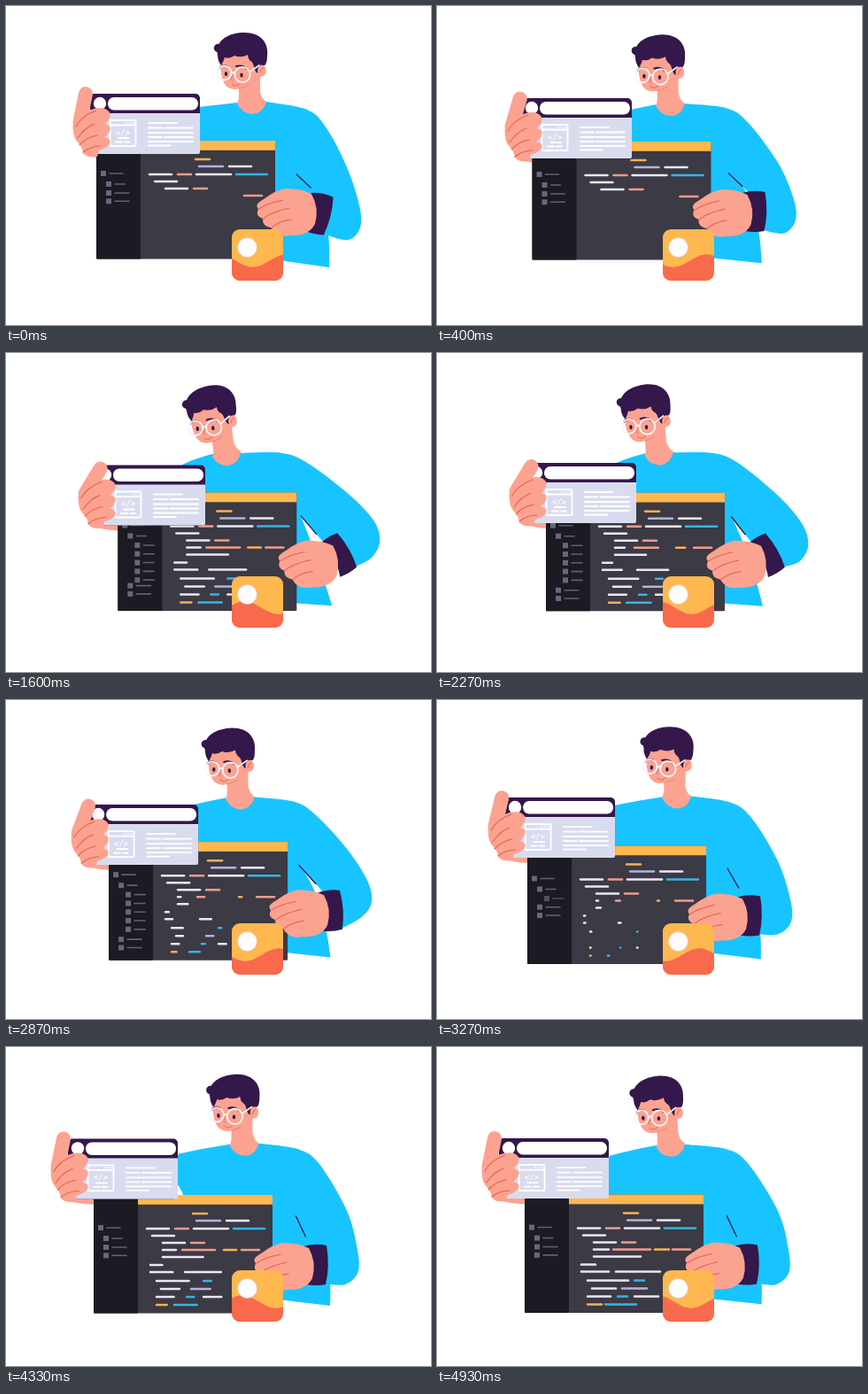
An HTML page for the animation above (5 s loop, 480x360 px).

```html
<!DOCTYPE html>
<html lang="en">
<head>
<meta charset="utf-8">
<title>Developer arranging windows</title>
<style>
  html, body { margin: 0; width: 100%; height: 100%; overflow: hidden; background: #fff; }
  svg { display: block; width: 100vw; height: 100vh; }
  text { font: bold 9px "DejaVu Sans Mono", monospace; }
</style>
</head>
<body>
<svg viewBox="0 0 480 360" fill="none" stroke-linecap="round" stroke-linejoin="round">
  <path id="body" fill="#18c4ff"/>
  <path id="sleeve" fill="#18c4ff"/>
  <path id="armpit" stroke="#2f144c" stroke-width="1.3"/>

  <g id="head">
    <path fill="#fba390" d="M263 84V101Q263 107 261 110Q267 122 279 122Q290 121 294 108Q288 104 287 96V76Z"/>
    <path fill="#fba390" d="M243 52Q241 75 245 84Q248 93 257 94Q268 94 275 88L288 80L290 52Z"/>
    <path stroke="#ee8474" stroke-width="1" d="M264 93Q270 92 274 89"/>
    <circle cx="239.500" cy="47.500" r="4.700" fill="#34174b"/>
    <path fill="#34174b" d="M239 55C236 41 248 31 267 30C288 29 297 42 295 56Q295 65 292 67Q286 66 284 76C279 72 281 64 276 62Q273 59 273 55Q266 59 258 56Q252 60 247 58Q246 62 243 67Q239 62 239 55Z"/>
    <ellipse cx="289" cy="73" rx="4.800" ry="6.500" fill="#fba390"/>
    <path stroke="#ee6a58" d="M287 75Q288 70 291 70M256 79Q253 83 256 84M255 88Q259 92 264 88"/>
    <path stroke="#34174b" stroke-width="2" d="M241 70Q244 66 250 68M260 68Q267 66 272 71"/>
    <g fill="#34174b">
      <ellipse cx="248.500" cy="76.500" rx="1.700" ry="2.500"/>
      <ellipse cx="266" cy="78" rx="1.700" ry="2.500"/>
    </g>
    <g stroke="#f6f4f8" stroke-width="1.800">
      <circle cx="246.500" cy="75.500" r="8"/>
      <circle cx="267" cy="77.500" r="8.700"/>
      <path d="M254.300 76Q256 74 258.500 76M275.500 74L286 67"/>
    </g>
  </g>

  <path id="thumb" fill="#fba390" d="M-8 56Q-8 69 4 71Q20 75 40 74V50Z"/>

  <g id="editor">
    <rect width="202" height="133.500" rx="1" fill="#3b3a45"/>
    <rect x="50" width="152" height="10.800" fill="#ffb74f"/>
    <rect width="50" height="133.500" rx="1" fill="#1c1a22"/>
    <g id="tree"></g>
    <g id="code" stroke-width="2.500"></g>
  </g>

  <g id="browser">
    <rect width="124" height="68" rx="5" fill="#34174b"/>
    <path fill="#d9dcef" d="M0 22H124V66Q124 68 122 68H2Q0 68 0 66Z"/>
    <circle cx="11" cy="11" r="7.200" fill="#fff"/>
    <rect x="20" y="4" width="102" height="14.500" rx="7" fill="#fff"/>
    <g stroke="#fff" stroke-width="1.800">
      <rect x="22.500" y="30" width="29" height="29" rx="1"/>
      <path d="M23 35.500H51M32 50H44M29 54.500H36M39 54.500H45M41 32.800H41.100M45 32.800H45.100M48.500 32.800H48.600"/>
      <path d="M66 33H98M66 38.500H81M84 38.500H116M66 44H116M66 49H81M84 49H116M66 54H116M66 58.500H91"/>
    </g>
    <text x="37" y="47" text-anchor="middle" fill="#fff">&lt;/&gt;</text>
  </g>

  <g id="fingers">
    <path id="index" stroke="#fba390" stroke-width="16" d="M-11.500 32L-5 0"/>
    <path fill="#fba390" d="M-19.500 35Q-16 27 -5 21Q8 14 17 17Q25 21 22 27Q20 31 17 34Q25 36 22 42Q20 47 16 49Q25 51 22 57Q18 62 10 64L8 71Q-3 73 -8 67Q-9 60 -13 56Q-20 50 -19.500 35Z"/>
    <path stroke="#e5604d" stroke-width="1.100" d="M-16 37Q-10 25 7 19M-14 50Q-6 38 5 34M-12 58Q-4 49 8 47M-8 66Q1 59 12 59"/>
  </g>

  <path id="cuff" fill="#34174b" d="M-4 -22Q9 -26 22 -23Q26 0 21 21Q11 23 -1 21Q8 0 -4 -22Z"/>
  <g id="hand">
    <path fill="#fba390" d="M243 60Q232 54 214 54Q204 55 189 66Q178 72 183 77Q179 85 188 88Q187 96 197 98Q204 110 218 107Q240 108 247 94Q252 76 243 60Z"/>
    <path stroke="#e5604d" stroke-width="1.100" d="M184 77Q192 71 211 67M189 88Q196 81 218 76M198 98Q205 91 220 89"/>
  </g>

  <clipPath id="cardShape"><rect x="255" y="252" width="58" height="58" rx="9"/></clipPath>
  <g clip-path="url(#cardShape)">
    <rect x="255" y="252" width="58" height="58" fill="#ffb74f"/>
    <path id="wave" fill="#f9694c"/>
  </g>
  <circle cx="272.500" cy="272.500" r="11" fill="#fdfbfb" stroke="#dcc9b4" stroke-width=".7"/>
</svg>

<script>
const LOOP = 5000, FPS = 15;
const el = id => document.getElementById(id);
const clamp = v => Math.max(0, Math.min(1, v));
const ease = v => (1 - Math.cos(Math.PI * clamp(v))) / 2;
const lerp = (a, b, k) => a + (b - a) * k;
const mix = (p, q, k) => [lerp(p[0], q[0], k), lerp(p[1], q[1], k)];
const add = (parent, tag, attrs) => {
  const node = document.createElementNS('http://www.w3.org/2000/svg', tag);
  return parent.appendChild(set(node, attrs));
};
function set(node, attrs) {
  for (const k in attrs) node.setAttribute(k, attrs[k]);
  return node;
}
const move = (id, x, y, r = 0) =>
  el(id).setAttribute('transform', `translate(${x} ${y}) rotate(${r})`);

// Seconds, shared by every animated property.
const keys = [0, .4, 1, 1.25, 2.27, 2.67, 2.87, 3.27, 3.67, 4.2, 4.93];
const tracks = {
  editorX: [102, 107.5, 126, 127, 123, 120, 116, 102, 99, 99, 99],
  editorY: [152, 153, 156.7, 157.3, 157.7, 159, 160.2, 164.5, 167, 167, 166.5],
  browserX: [95, 96, 100, 101, 101, 99, 93, 77, 70, 70, 70],
  browserY: [99, 104, 126, 127, 124, 121.5, 118, 110, 105, 103.5, 103],
  neckX: [0, -14, -27, -28, -26.5, -18, -13, -7, -6, -8, -14],
  neckY: [0, 2.2, 4.8, 5, 4.5, 2.8, 1.5, .5, .5, .8, 2],
  tilt: [0, -1, -8, -8, -5, -2, -1, 1.5, 2, 0, -4],
  cuff: [13, 0, -28, -31, -31, -14, -5, 0, 0, 0, 0],
  index: [0, 5, 20, 20, 20, 14, 9, 2, 0, 0, 0]
};

// Monotone cubic interpolation: smooth, without overshoot.
function sample(values, t) {
  const slope = i => (values[i + 1] - values[i]) / (keys[i + 1] - keys[i]);
  const tangent = i => {
    if (i === 0) return slope(0);
    if (i === keys.length - 1) return slope(i - 1);
    const a = slope(i - 1), b = slope(i);
    return a * b <= 0 ? 0 : 2 * a * b / (a + b);
  };
  let i = 0;
  while (i < keys.length - 2 && t >= keys[i + 1]) i++;
  const h = keys[i + 1] - keys[i], u = clamp((t - keys[i]) / h), v = 1 - u;
  return values[i] * (1 + 2 * u) * v * v + values[i + 1] * u * u * (3 - 2 * u)
    + h * u * v * (tangent(i) * v - tangent(i + 1) * u);
}

function spline(points) {
  let d = `M${points[0]}`;
  for (let i = 0; i < points.length - 1; i++) {
    const a = points[i], b = points[i + 1];
    const before = points[i - 1] || a, after = points[i + 2] || b;
    const c1 = [0, 1].map(k => a[k] + (b[k] - before[k]) / 6);
    const c2 = [0, 1].map(k => b[k] - (after[k] - a[k]) / 6);
    d += `C${c1} ${c2} ${b}`;
  }
  return d;
}

const ink = { w: '#e9e7f3', s: '#f39b8b', o: '#fbb055', b: '#36b4e6', l: '#b3b3dc' };
// Each bar: colour, start, length.
const rows = [
  [21, 'o 112 16'],
  [29, 'l 116 27', 'w 150 25'],
  [38, 'w 60 25', 's 92 15', 'w 113 39', 'b 158 35'],
  [46, 'w 66 25'],
  [54, 'w 78 25', 's 110 15'],
  [62, 'w 78 17', 's 100 42', 'o 147 16', 's 167 20'],
  [70, 'w 78 53'],
  [79, 'w 64 16'],
  [87, 'w 64 31', 'w 103 50'],
  [97, 'w 71 46', 'b 124 11'],
  [106, 'w 76 27', 'l 110 28'],
  [115, 'w 71 26', 'b 105 11', 'w 124 27'],
  [124, 'o 71 16', 'b 91 35']
];
const growing = [];
rows.forEach(([y, ...bars], row) => bars.forEach(bar => {
  const [colour, x, length] = bar.split(' ');
  const node = add(el('code'), 'line', { x1: x, x2: +x + +length, y1: y, y2: y, stroke: ink[colour] });
  if (row > 4 && x !== '167') growing.push({ node, row: row - 5, x: +x, length: +length });
}));

function treeItem(x, y, length) {
  const g = add(el('tree'), 'g', { transform: `translate(${x} ${y})` });
  add(g, 'rect', { width: 6, height: 6, fill: '#69677c' });
  add(g, 'path', { d: `M10 3h${length}`, stroke: '#625f7b', 'stroke-width': 1.6 });
  return g;
}
treeItem(5, 34, 15);
treeItem(11, 46, 11);
const children = [0, 1, 2, 3, 4].map(i => treeItem(19, 56.5 + i * 9.8, 12));
const lower = [treeItem(11, 56, 16), treeItem(11, 65, 16)];

function drawCode(t) {
  for (const { node, row, x, length } of growing) {
    const s = t - row * .028;
    const amount = s < 1.77 ? clamp((s - .4) / 1.335)
      : s < 3.12 ? clamp((3.12 - s) / 1.335) : clamp((s - 3.12) / 1.3);
    set(node, { x2: x + length * amount, visibility: amount > .01 ? 'visible' : 'hidden' });
  }
  const open = ease((t - 1.2) / .5) * (1 - ease((t - 2.95) / .45));
  children.forEach((node, i) => node.setAttribute('opacity', clamp(open * 6 - i - .5)));
  lower.forEach((node, i) => set(node, { transform: `translate(11 ${56 + i * 9.3 + open * 51})` }));
}

function drawPerson(p) {
  const lean = -p.neckX / 26, reach = (p.editorX - 102) / 24;
  const wrist = [p.editorX + 241, p.editorY + 80 + p.cuff * .1];
  const a = p.cuff * Math.PI / 180;
  const onCuff = (x, y) => [
    wrist[0] + x * Math.cos(a) - y * Math.sin(a),
    wrist[1] + x * Math.sin(a) + y * Math.cos(a)
  ];
  const collarL = [261 + p.neckX, 109 + p.neckY], collarR = [293 + p.neckX, 108 + p.neckY];
  const shoulder = [mix([340, 117], [312, 113], lean), mix([362, 138], [340, 124], lean)];
  const elbow = [
    mix([385, 182], [384, 157], reach), mix([399, 225], [414, 188], reach),
    mix([400, 250], [422, 212], reach), mix([386, 264], [413, 231], reach)
  ];
  const armpit = [328 + 5 * reach, 190 - 6 * reach];
  const hem = mix([365, 295], [368, 286], lean);
  const side = mix([368, 205], [350, 225], reach);
  const cuffTop = onCuff(3, -23);

  el('body').setAttribute('d',
    `M${collarL}Q${collarL[0] - 28} ${collarL[1] + 3 + 4 * lean} 195 ${117 + 11 * lean}L186 148`
    + `Q196 155 ${213 - 40 * lean} 167L200 276L260 ${280 - 2 * lean}L${hem}`
    + `Q${side} ${armpit}L${shoulder[1]}L${shoulder[0]}L${collarR}Z`);
  el('sleeve').setAttribute('d',
    spline([collarR, ...shoulder, ...elbow, onCuff(20, 20)])
    + `L${onCuff(14, 0)}L${cuffTop}L${armpit}Z`);
  el('armpit').setAttribute('d', `M${armpit}L${mix(armpit, cuffTop, .7)}`);
  el('head').setAttribute('transform',
    `translate(${p.neckX} ${p.neckY}) rotate(${p.tilt} 278 112)`);
  move('cuff', ...wrist, p.cuff);
  move('hand', p.editorX, p.editorY);
}

function drawWave(t) {
  const crest = 316.5 - 29.5 * t;
  let d = 'M255 312';
  for (let x = 255; x <= 313; x += 2)
    d += `L${x} ${287.5 - 7.2 * Math.cos((x - crest) * Math.PI / 38)}`;
  el('wave').setAttribute('d', d + 'V312Z');
}

function draw(t) {
  const p = {};
  for (const name in tracks) p[name] = sample(tracks[name], t);
  drawPerson(p);
  move('editor', p.editorX, p.editorY);
  for (const id of ['browser', 'thumb', 'fingers']) move(id, p.browserX, p.browserY);
  el('index').setAttribute('transform', `rotate(${p.index} -11 32)`);
  drawCode(t);
  drawWave(t);
}

let start;
function tick(now) {
  start ??= now;
  const ms = (now - start) % LOOP;
  draw(Math.floor(ms * FPS / 1000 + .001) / FPS);
  requestAnimationFrame(tick);
}
draw(0);
requestAnimationFrame(tick);
</script>
</body>
</html>
```
